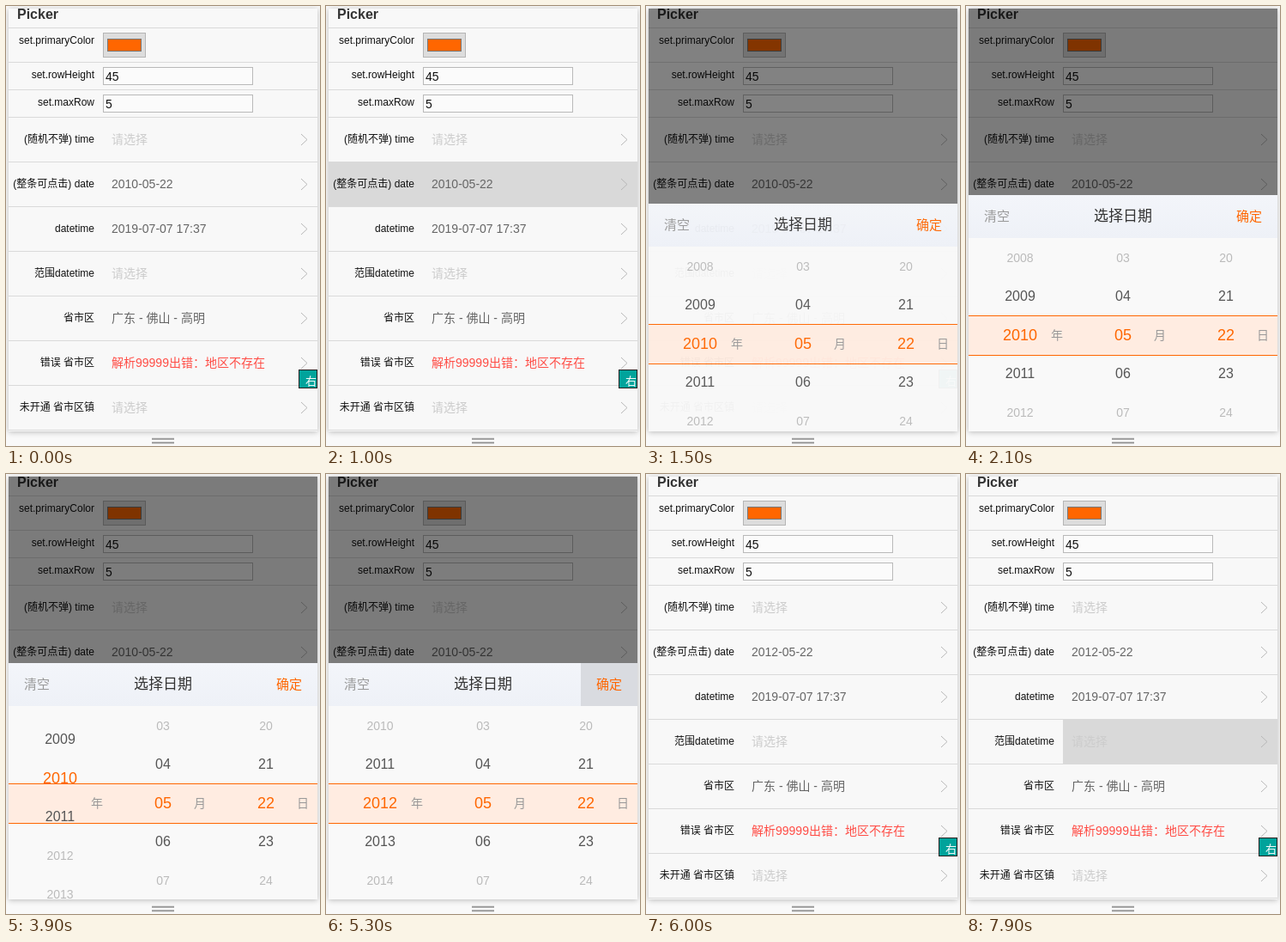
Write an HTML page that moves like this. It is 366x512 px and loops after 8 s.

```html
<!DOCTYPE html>
<html lang="zh-CN">
<head>
<meta charset="utf-8">
<title>Picker</title>
<style>
html, body { margin: 0; width: 100%; height: 100%; overflow: hidden; background: #f9f9f9; }
svg { display: block; font-family: "Liberation Sans", Arial, "Noto Sans CJK SC", "Noto Sans CJK", sans-serif; }
.frame { fill: #f8f8f8; filter: drop-shadow(0 1px 3px rgba(0, 0, 0, .25)); }
</style>
</head>
<body>
<svg id="stage" width="366" height="512" viewBox="0 0 366 512">
  <clipPath id="screen"><rect x="3" y="3" width="360" height="492"/></clipPath>
  <clipPath id="wheel"><rect x="3" y="270" width="360" height="225"/></clipPath>
  <linearGradient id="bar" x2="0" y2="1">
    <stop stop-color="#f3f5fa"/><stop offset="1" stop-color="#eef1f7"/>
  </linearGradient>
  <rect class="frame" x="3" y="3" width="360" height="492"/>
  <path d="M170 503.8h26M170 508.2h26" stroke="#999" stroke-width="2"/>
  <g clip-path="url(#screen)">
    <g id="page"></g>
    <rect id="shade" x="3" y="3" width="360"/>
    <g id="panel">
      <rect x="3" y="220" width="360" height="275" fill="#f9f9f9"/>
      <rect x="3" y="220" width="360" height="50" fill="url(#bar)"/>
      <rect id="press" x="297" y="220" width="66" height="50" fill="#d9dbe0"/>
      <g id="head"></g>
      <circle id="spinner" cx="159" cy="383" r="7" fill="none" stroke="#999" stroke-width="2"/>
      <g id="cols" clip-path="url(#wheel)">
        <rect x="3" y="360.5" width="360" height="46" fill="#ffece1"/>
        <path d="M3 360.5h360M3 406.5h360" stroke="#f60"/>
      </g>
    </g>
  </g>
</svg>
<script>
const $ = id => document.getElementById(id);
const ORANGE = '#ff6600';

function add(parent, tag, attrs, content) {
  const el = document.createElementNS('http://www.w3.org/2000/svg', tag);
  for (const k in attrs) el.setAttribute(k, attrs[k]);
  if (content) el.textContent = content;
  return parent.appendChild(el);
}
const set = (id, attrs) => { for (const k in attrs) $(id).setAttribute(k, attrs[k]); };
const show = (el, on) => el.setAttribute('visibility', on ? 'visible' : 'hidden');
const text = (parent, x, y, size, fill, content, anchor = 'start') =>
  add(parent, 'text', { x, y, 'font-size': size, fill, 'text-anchor': anchor }, content);
const box = (x, y, width, height, fill, stroke = 'none') =>
  add($('page'), 'rect', { x, y, width, height, fill, stroke });
const line = y => add($('page'), 'path', { d: `M3 ${y}.5h360`, stroke: '#dadada' });
const label = (y, content) => text($('page'), 103, y, 12, '#111', content, 'end');

// Settings form
const page = $('page');
text(page, 13, 15, 16, '#333', 'Picker').setAttribute('font-weight', 'bold');
[25, 65, 97, 129].forEach(line);
label(44, 'set.primaryColor');
label(84, 'set.rowHeight');
label(116, 'set.maxRow');
box(113.5, 31.5, 49, 28, '#ddd', '#b5b5b5');
box(118.5, 38.5, 39, 14, ORANGE, '#777');
[[71.5, '45'], [103.5, '5']].forEach(([y, value]) => {
  box(113.5, y, 174, 20, '#fbfbfb', '#b9b9b9');
  text(page, 116, y + 15.5, 14, '#111', value);
});

// Pressed row backgrounds
const dateTap = box(3, 182, 360, 51, '#d9d9d9');
const rangeTap = box(113, 286, 250, 51, '#d9d9d9');

// Field rows
const HINT = '请选择';
const values = [
  ['(随机不弹) time', HINT],
  ['(整条可点击) date', '2010-05-22'],
  ['datetime', '2019-07-07 17:37'],
  ['范围datetime', HINT],
  ['省市区', '广东 - 佛山 - 高明'],
  ['错误 省市区', '解析99999出错：地区不存在', '#ff4d46'],
  ['未开通 省市区镇', HINT]
].map(([name, value, color], i) => {
  const y = 155 + 52 * i;
  label(y + 4, name);
  add(page, 'path', { d: `M344 ${y - 6}l7 6.5l-7 6.5`, fill: 'none', stroke: '#b8b8b8' });
  line(y + 26);
  return text(page, 123, y + 5, 14, color || (value === HINT ? '#ccc' : '#666'), value);
});
box(341.5, 423.5, 21, 21, '#00a39b', '#222');
text(page, 349, 441, 13, '#fff', '右');

// Date picker
text($('head'), 21, 250, 15, '#999', '清空');
text($('head'), 183, 250, 17, '#333', '选择日期', 'middle');
text($('head'), 315, 250, 15, ORANGE, '确定');

function column(x, from, to, unit) {
  text($('cols'), x + 36, 388, 14, '#999', unit);
  const items = [];
  for (let n = from; n <= to; n++)
    items.push([n, text($('cols'), x, 0, 14, '#bbb', String(n).padStart(2, '0'), 'middle')]);
  return (selected, position) => items.forEach(([n, el]) => {
    const level = Math.min(Math.abs(n - selected), 2);
    const size = 18 - 2 * level;
    el.setAttribute('font-size', size);
    el.setAttribute('fill', [ORANGE, '#555', '#bbb'][level]);
    el.setAttribute('y', 382.7 + (n - position) * 45 + size * .36);
  });
}
const years = column(63, 2007, 2015, '年');
column(183, 3, 7, '月')(5, 5);
column(303, 20, 24, '日')(22, 22);

const between = (t, a, b) => t >= a && t < b;
const easeOut = (t, start, length, power) =>
  1 - (1 - Math.min(Math.max((t - start) / length, 0), 1)) ** power;

function draw(t) {
  const open = easeOut(t, 1200, 600, 4.8);
  const slide = easeOut(t, 5400, 300, 3);
  const fade = t < 5700 ? 1 : Math.max(0, (6000 - t) / 300);
  const alpha = open * fade;
  const shift = Math.round(275 * (1 - open) + 273 * slide);

  set('panel', { transform: `translate(0 ${shift})`, opacity: alpha });
  set('shade', { height: 217 + shift, opacity: alpha / 2 });
  show($('panel'), alpha > 0);
  show($('spinner'), between(t, 1300, 1500));
  show($('cols'), between(t, 1500, 6000));
  show($('press'), between(t, 5300, 5500));
  show(dateTap, between(t, 1000, 1300));
  show(rangeTap, t >= 7900);
  values[1].textContent = t < 5500 ? '2010-05-22' : '2012-05-22';
  years(t < 4200 ? 2010 : 2012, 2010 + 2 * easeOut(t, 3800, 900, 3.3));
}

// The motion advances ten times a second
const start = performance.now();
function tick() {
  const t = (performance.now() - start) % 8000;
  draw(Math.floor(t / 100) * 100);
  requestAnimationFrame(tick);
}
tick();
</script>
</body>
</html>
```
